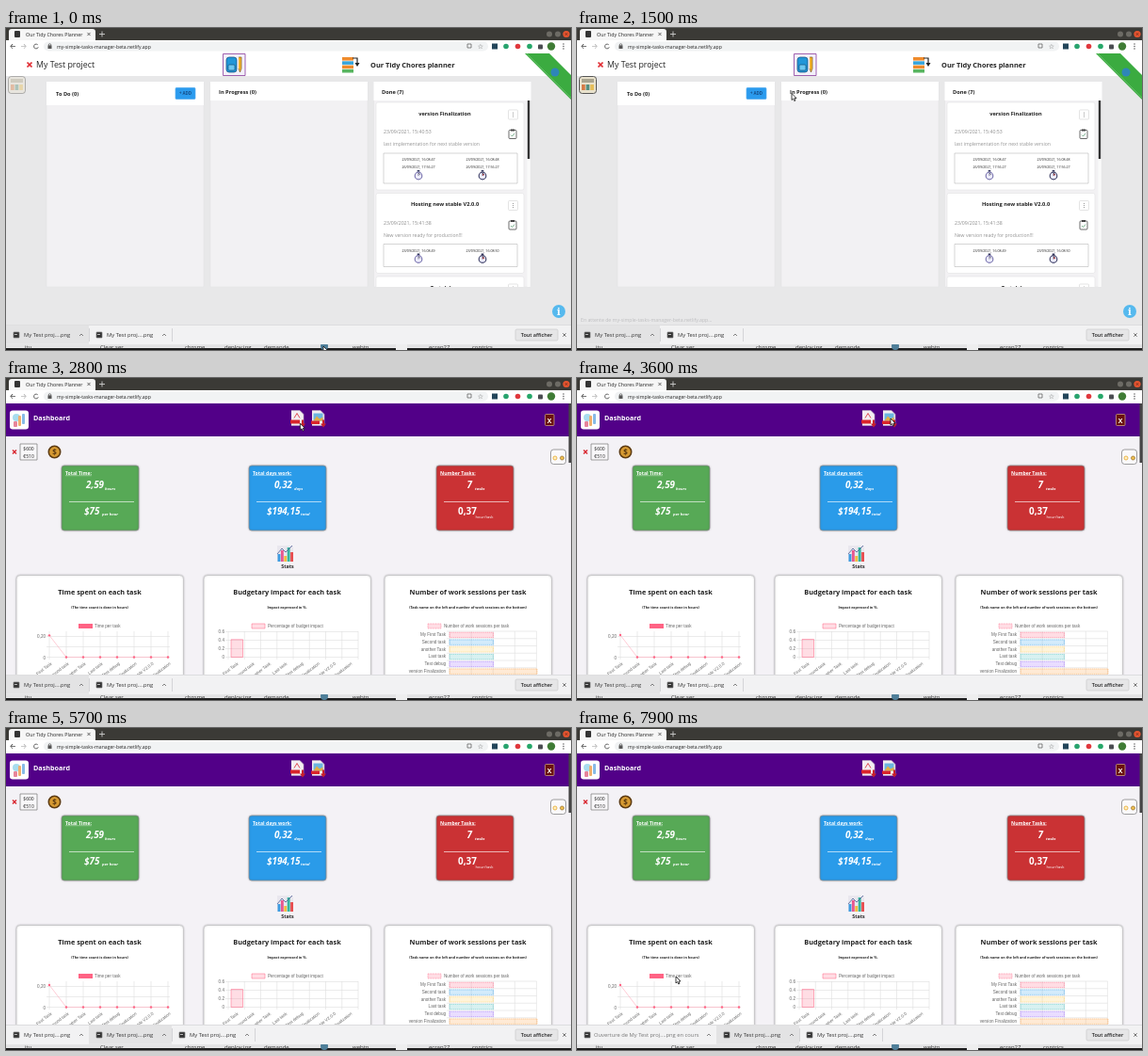
Recreate the animation shown at these times as an HTML page with a canvas. Size 600x342 px, loop 8 s.

```html
<!DOCTYPE html>
<html lang="en">
<head>
<meta charset="utf-8">
<title>Task board</title>
<style>
html, body { margin: 0; width: 100%; height: 100%; overflow: hidden; }
canvas { display: block; width: 600px; height: 342px; }
</style>
</head>
<body>
<canvas id="stage" width="600" height="342"></canvas>
<script>
const c = document.getElementById('stage').getContext('2d');
const LOOP = 8000, PAGE = 1800, SAVED = 5500, OPENING = 7100;
const SANS = '"Open Sans", sans-serif', CHART = '"Liberation Sans", sans-serif';
const TASKS = ['My First Task', 'Second task', 'another Task', 'Last task', 'Test debug',
  'version Finalization', 'Hosting new stable V2.0.0', 'version Finalization'];
const HUES = ['255,99,132', '54,162,235', '255,206,86', '75,192,192', '153,102,255', '255,159,64'];
const PATH = [[0, 337, 338], [250, 337, 338], [850, 10, 62], [1150, 10, 62], [1450, 228, 69.5],
  [2300, 228, 69.5], [3000, 333, 43], [3800, 333, 43], [4500, 330, 346], [5700, 330, 346],
  [6350, 2, 323], [6700, 2, 323], [6950, 25, 326], [7250, 25, 326], [7750, 105, 264], [8000, 105, 264]];

const clamp = v => Math.max(0, Math.min(1, v));
const easeOut = (v, power) => 1 - (1 - clamp(v)) ** power;

function rect(x, y, w, h, fill, stroke, r = 0, line = 0.7) {
  c.beginPath();
  c.roundRect(x, y, w, h, r);
  paint(fill, stroke, line);
}
function circle(x, y, r, fill, stroke, line = 0.8) {
  c.beginPath();
  c.arc(x, y, r, 0, 7);
  paint(fill, stroke, line);
}
function poly(points, fill, stroke, line = 0.8) {
  c.beginPath();
  for (let i = 0; i < points.length; i += 2) c.lineTo(points[i], points[i + 1]);
  paint(fill, stroke, line);
}
function paint(fill, stroke, line) {
  if (fill) { c.fillStyle = fill; c.fill(); }
  if (stroke) { c.strokeStyle = stroke; c.lineWidth = line; c.stroke(); }
}
function text(str, x, y, size, color = '#222', style = '', align = 'left', family = SANS) {
  c.font = `${style} ${size}px ${family}`;
  c.textAlign = align;
  c.fillStyle = color;
  c.fillText(str, x, y);
}
function cross(x, y, r, color, line) {
  poly([x - r, y - r, x + r, y + r], null, color, line);
  poly([x + r, y - r, x - r, y + r], null, color, line);
}
function shadowed(draw) {
  c.save();
  c.shadowColor = 'rgba(0,0,0,.25)';
  c.shadowBlur = 2;
  draw();
  c.restore();
}
function clipped(x, y, w, h, draw) {
  c.save();
  c.beginPath();
  c.rect(x, y, w, h);
  c.clip();
  draw();
  c.restore();
}

function browser() {
  rect(0, 0, 600, 13, '#3b3a36');
  rect(3, 1, 92, 14, '#f6f6f6', null, 3);
  rect(9, 3, 6, 7, '#333', null, 1);
  text('Our Tidy Chores Planner', 21, 8.8, 5.3);
  cross(88, 6.5, 1.6, '#444', 0.8);
  poly([99, 6.5, 105, 6.5], null, '#ddd');
  poly([102, 3.5, 102, 9.5], null, '#ddd');
  circle(577, 6.5, 3, '#6d6b65');
  circle(586, 6.5, 3, '#6d6b65');
  circle(595, 6.5, 3.6, '#e9542f');
  cross(595, 6.5, 1.3, '#5b2a1c', 0.7);
  rect(0, 13, 600, 14, '#fff');
  poly([10, 19.5, 5, 19.5, 7, 17, 5, 19.5, 7, 22], null, '#555');
  poly([16, 19.5, 21, 19.5, 19, 17, 21, 19.5, 19, 22], null, '#bbb');
  c.beginPath();
  c.arc(32, 19.5, 2.4, 0.3, 5.6);
  paint(null, '#555', 0.9);
  rect(40, 14.5, 472, 10, '#f1f3f4', null, 5);
  rect(44.5, 18.5, 4, 3.5, '#555');
  circle(46.5, 18, 1.3, null, '#555', 0.7);
  text('my-simple-tasks-manager-beta.netlify.app', 54, 21.5, 5.1);
  rect(490, 17, 4, 4, null, '#555');
  text('☆', 504, 22.2, 7, '#555', '', 'center', '"DejaVu Sans", sans-serif');
  rect(516, 16.5, 6, 6, '#24465a');
  circle(531, 19.5, 2.8, '#29a36e');
  circle(543.5, 19.5, 2.8, '#e0383d');
  circle(556, 19.5, 2.8, '#25a768');
  rect(565, 17.5, 5, 5, '#4a4d51', null, 1);
  circle(579, 19.5, 4.2, '#3f7c35');
  for (const y of [17, 19.5, 22]) circle(592, y, 0.7, '#444');
}

function board(t) {
  rect(0, 26, 600, 289, '#e8e8e9');
  rect(0, 26, 600, 25, '#fff');
  cross(25, 39, 2.5, '#e02b32', 1.7);
  text('My Test project', 32, 42, 8.8);
  rect(230.5, 27.5, 23.5, 23, '#f3f0fa', '#8a3b9c', 0, 0.8);
  rect(234, 31, 11, 16, '#2196d8', '#154f7a', 3);
  rect(236, 39, 7, 6, '#6cc7f0', '#154f7a', 1);
  poly([247, 31, 250, 31, 250, 43, 248.5, 47, 247, 43], '#f3b32c', '#6b4a16', 0.6);
  ['#ef8b2c', '#36a5dc', '#ef8b2c', '#57b560'].forEach((fill, i) => rect(357, 31 + i * 4.3, 12, 3.6, fill));
  poly([368, 32, 373, 32, 373, 39], null, '#222', 1.2);
  poly([370.5, 37, 375.5, 37, 373, 41], '#222');
  text('Our Tidy Chores planner', 387, 42, 7.4, '#222', 'bold');
  poly([550, 26, 576, 26, 600, 50, 600, 76], '#3bab40');
  poly([552, 26, 600, 74], null, '#84cf88', 0.5);
  circle(583, 47, 4.5, '#2e86b7');

  c.globalAlpha = t < 800 ? 0.4 : 1;
  rect(2.5, 51.5, 18, 18, '#e9e2cd', '#555', 3, 1);
  rect(5, 54, 13, 4, '#a9a48f');
  for (let i = 0; i < 3; i++) rect(5 + i * 4.6, 60, 3.7, 6, ['#d67b46', '#548f80', '#e5bd57'][i]);
  c.globalAlpha = 1;

  [[43, 25, 'To Do (0)', 53, 71.5], [217, 20, 'In Progress (0)', 226, 70], [390.5, 20, 'Done (7)', 399, 70]]
    .forEach(([x, h, label, tx, ty]) => {
      rect(x, 57, 167, 218, '#f2f1f3', '#e0e0e2', 1, 0.5);
      rect(x, 57, 167, h, '#fff');
      text(label, tx, ty, 5.7, '#222', 'bold');
    });
  rect(180, 63.5, 21, 12, '#2b9bee', '#50aaf0', 1);
  text('+ ADD', 190.5, 71.3, 4.4, '#174d87', 'bold', 'center');

  clipped(391, 77, 166, 198, () => {
    card(79, 'version Finalization', '23/09/2021, 15:40:53', 'last implementation for next stable version',
      ['23/09/2021, 16:08:47', '26/09/2021, 17:56:27'], ['23/09/2021, 16:08:48', '26/09/2021, 17:56:27']);
    card(175.5, 'Hosting new stable V2.0.0', '23/09/2021, 15:41:38', 'New version ready for production!!!',
      ['23/09/2021, 16:08:49'], ['23/09/2021, 16:08:50']);
    card(264, 'Test debug', '', '', [], []);
    rect(553.5, 77, 3, 198, '#fafafa');
    rect(553.8, 77, 2.4, 62, '#333');
  });
  circle(587, 301, 7, '#56b9ee');
  text('i', 587, 305, 11, '#fff', 'bold', 'center', '"Noto Serif", serif');
  if (t > 1200) text('En attente de my-simple-tasks-manager-beta.netlify.app…', 4, 312, 5.2, '#bdbdbf');
}

function card(y, title, date, note, starts, ends) {
  const boxHeight = 16 + starts.length * 8;
  rect(393, y, 157, boxHeight + 61, '#fff', '#e2e2e5', 2, 0.6);
  text(title, 466, y + 13.5, 5.7, '#222', 'bold', 'center');
  rect(533.5, y + 8, 10, 10, '#fff', '#d8d8d8', 1);
  for (let i = -1; i < 2; i++) circle(538.5, y + 13 + i * 2, 0.5, '#777');
  if (!date) return;
  text(date, 401, y + 33, 5.2, '#8b8b8b');
  text(note, 401, y + 46, 5.1, '#949494');
  rect(534, y + 29.5, 8, 9, '#fff', '#444', 1, 0.8);
  rect(536, y + 28.5, 4, 2, '#444');
  poly([536, y + 34.5, 537.5, y + 36, 540, y + 33], null, '#3f8f5c', 0.7);
  rect(401, y + 54, 142, boxHeight, '#fff', '#aaa', 0, 0.5);
  [[438, starts, '#7d78b0', '#f3eefa'], [506, ends, '#44466b', '#d34a48']].forEach(([x, lines, rim, hand]) => {
    lines.forEach((line, i) => text(line, x, y + 62 + i * 8, 3.6, '#222', '', 'center'));
    const cy = y + 62 + lines.length * 8;
    circle(x, cy, 3.8, '#eef', rim, 1.2);
    rect(x - 1.3, cy - 6, 2.6, 1.5, '#33375c');
    poly([x, cy, x, cy - 3, x + 2.2, cy - 1], hand, '#334', 0.6);
  });
}

function dashboard(t) {
  rect(0, 26, 600, 289, '#f4f2f6');
  rect(0, 26, 600, 36, '#520088');
  rect(4, 34.5, 20, 20, '#fff', null, 3);
  circle(11, 42, 4, '#a8dcee');
  rect(13, 40, 3, 11, '#f0b06f', null, 1);
  rect(17, 38, 3, 11, '#87b9e7', null, 1);
  rect(8, 46, 4, 6, '#e7859a', null, 1);
  text('Dashboard', 29, 45.3, 7.2, '#fff', 'bold');
  clipped(0, 27, 600, 35, () => {
    fileIcon(303, 34.5 - 36 * (1 - easeOut((t - 1850) / 500, 2)), true);
    fileIcon(325, 34.5 - 36 * (1 - easeOut((t - 1780) / 480, 2)), false);
  });
  rect(572.5, 38.5, 9.5, 12, '#6a1010', '#c9a27a', 1, 0.8);
  text('X', 577.2, 47.5, 7, '#fff', 'bold', 'center');

  cross(9, 78.5, 2, '#d8262f', 1.4);
  rect(15, 70, 18, 17, '#f8f7f9', '#777');
  text('$600', 24, 76.8, 5, '#222', '', 'center');
  text('€510', 24, 85, 5, '#222', '', 'center');
  circle(51.5, 78.5, 6.2, '#d79a32', '#5d3b12', 1.6);
  text('$', 51.5, 81.5, 8, '#5d3b12', 'bold', 'center');
  rect(578.5, 76, 16, 15.5, '#faf9fb', '#777', 3);
  circle(583, 85, 2, '#fff1c4', '#e5a72c', 0.8);
  circle(590.5, 85, 2, '#f1c151', '#9b7632', 0.8);

  tile(59, '#57a956', 'Total Time:', [85, '2,59', 105, 'hours'], [83, '$75', 102, 'per hour']);
  tile(258, '#2a9be9', 'Total days work:', [285, '0,32', 306, 'days'], [277, '$194,15', 313, 'total']);
  tile(457, '#ca3234', 'Number Tasks:', [489.5, '7', 498, 'tasks'], [480, '0,37', 498.5, 'hour/task'], true);

  rect(288, 178, 17, 17, '#e9e7ee');
  [8, 12, 6, 15, 10].forEach((h, i) =>
    rect(288.5 + i * 3.4, 195 - h, 2.9, h, ['#3d9be0', '#e8578f', '#f2bd3e', '#36b59e', '#e84d50'][i]));
  poly([288, 187, 293, 181, 297, 185, 304, 178], null, '#4a5a94', 0.8);
  text('Stats', 299, 202, 5.3, '#222', 'bold', 'center');

  panel(11, 'Time spent on each task', '(The time count is done in hours)');
  panel(210, 'Budgetary impact for each task', 'Impact expressed in %.');
  panel(402, 'Number of work sessions per task', '(Task name on the left and number of work sessions on the bottom)');
  charts(t);
  rect(597.5, 27, 2.5, 63, '#444');
}

function fileIcon(x, y, pdf) {
  poly([x, y, x + 9, y, x + 13, y + 4, x + 13, y + 16, x, y + 16], '#f3eef2', '#b9aebf', 0.6);
  if (pdf) {
    rect(x - 1, y + 10, 10, 4, '#d8242b');
    poly([x + 3, y + 8, x + 6, y + 3, x + 9, y + 8], null, '#d8242b');
  } else {
    rect(x + 1.5, y + 3, 10, 8, '#6bb4e0');
    poly([x + 1.5, y + 11, x + 5, y + 6, x + 8, y + 9, x + 11.5, y + 7, x + 11.5, y + 11], '#e2ae45');
    rect(x - 1, y + 11, 9, 3.5, '#d8242b');
  }
  poly([x + 9, y + 14, x + 11, y + 14, x + 11, y + 10, x + 13, y + 10, x + 13, y + 14, x + 15, y + 14, x + 12, y + 18], '#c71f2b');
}

function tile(x, fill, label, top, bottom, upright) {
  shadowed(() => rect(x, 93, 82, 69, fill, '#909090', 3, 0.7));
  text(label, x + 4, 102.5, 5.1, '#fff', 'bold');
  rect(x + 4, 103.6, c.measureText(label).width, 0.5, 'rgba(255,255,255,.7)');
  rect(x + 8, 131, 69, 0.7, 'rgba(255,255,255,.85)');
  const value = (row, y, style, unitStyle, drop) => {
    text(row[1], row[0], y, 9.9, '#fff', style);
    text(row[3], row[2], y + drop, 4.2, '#fff', unitStyle);
  };
  value(top, 117, 'italic bold', 'italic bold', 1.5);
  value(bottom, 145, upright ? 'bold' : 'italic bold', upright ? '' : 'italic bold', upright ? 3.7 : 1.2);
}

function panel(x, title, note) {
  shadowed(() => rect(x, 209.5, 177.5, 130, '#fff', '#c4c4c6', 4));
  text(title, x + 88.5, 230, 7.3, '#222', 'bold', 'center');
  text(note, x + 88.5, 245, 3.7, '#222', 'bold', 'center');
}

function charts(t) {
  const grid = (...points) => poly(points, null, '#dedede', 0.6);
  const label = (str, x, y, align) => text(str, x, y, 4.6, '#666', '', align, CHART);
  const slanted = (str, x, y) => {
    c.save();
    c.translate(x, y);
    c.rotate(-0.66);
    label(str, 0, 0, 'right');
    c.restore();
  };
  const bar = (x, y, w, h, hue, dash = []) => {
    c.setLineDash(dash);
    rect(x, y, w, h, `rgba(${hue},.22)`, `rgba(${hue},.85)`, 0, 0.6);
    c.setLineDash([]);
  };
  const pink = HUES[0];
  const grow = easeOut((t - 2150) / 1000, 4);

  rect(77, 261, 15, 5, '#ff6384');
  label('Time per task', 94, 265.2);
  bar(261, 261, 14, 5, pink);
  label('Percentage of budget impact', 278, 265.2);
  bar(448, 261, 14, 5, pink, [1, 0.6]);
  label('Number of work sessions per task', 465, 265.2);

  label('0,20', 42, 276, 'right');
  label('0', 42, 298.5, 'right');
  for (const y of [274.5, 285.5, 296.5]) grid(43, y, 174, y);
  for (let i = 0; i < 4; i++) {
    label(i ? (i / 5).toFixed(1) : '0', 232, 298 - i * 9, 'right');
    grid(233, 296.5 - i * 9, 374, 296.5 - i * 9);
  }
  TASKS.forEach((task, i) => {
    grid(46 + i * 18, 269, 46 + i * 18, 299);
    grid(236 + i * 17.25, 269, 236 + i * 17.25, 299);
    slanted(task, 49 + i * 18, 304);
    slanted(task, 247 + i * 17.25, 304);
  });
  grid(374, 269, 374, 299);
  if (grow > 0) {
    const first = 296.5 - 23.5 * grow;
    poly([46, first, 64, 296.5, 172, 296.5], null, '#ffa9bb', 0.6);
    TASKS.forEach((_, i) => circle(46 + i * 18, i ? 296.5 : first, 1.2, '#ff6384'));
    bar(239, 296.5 - 19 * grow, 12.5, 19 * grow, pink);
  }

  const reach = easeOut((t - 1742) / 1000, 4);
  for (let i = 0; i < 5; i++) grid(471 + i * 23.1, 269, 471 + i * 23.1, 318);
  HUES.forEach((hue, i) => {
    const y = 269 + i * 7.75;
    grid(468, y, 563.5, y);
    label(TASKS[i], 467, y + 5.2, 'right');
    bar(471, y + 1.2, (i < 5 ? 46.5 : 93) * reach, 5.4, hue, [1.3, 0.6]);
  });
}

function shelf(t) {
  rect(0, 315, 600, 21, '#f2f2f3');
  rect(0, 315, 600, 0.7, '#d6d6d8');
  const names = Array(t < SAVED ? 2 : 3).fill('My Test proj....png');
  const opening = t >= OPENING;
  let x = 0;
  names.forEach((name, i) => {
    const wide = opening && i === 0, width = wide ? 148 : 88;
    if (i === names.length - 2) rect(x, 315.7, width, 20, '#e3e3e4');
    rect(x + 8, 323, 6, 6, '#333', '#777', 0.5);
    rect(x + 9, 325, 3, 1, '#bbb');
    text(wide ? `Ouverture de ${name} en cours` : name, x + (wide ? 18 : 19), 328, 5.8, wide ? '#777' : '#333');
    poly([x + width - 10, 327, x + width - 8, 325, x + width - 6, 327], null, '#666', 0.8);
    x += width;
    rect(x, 319, 0.7, 14, '#c8c8ca');
  });
  if (t > 6100 && t < 6800) circle(10.5, 326, 4.8, null, '#e0583b', 1);
  rect(541, 320, 45, 12, '#e6e6e7', '#c9c9cb', 1.5);
  text('Tout afficher', 563.5, 328, 5.5, '#222', '600', 'center');
  cross(593, 326, 1.7, '#555', 0.8);

  rect(0, 336, 600, 4.5, '#e4e4e5');
  rect(0, 340, 600, 2, '#1c1c1c');
  clipped(0, 336, 600, 6, () => {
    [[20, 'itu'], [100, 'Clear ser'], [190, 'chrome'], [232, 'deploy.jpg'], [274, 'demande'],
      [368, 'webtn'], [449, 'ecran27...'], [495, 'contrics']]
      .forEach(([lx, str]) => text(str, lx, 340.5, 6, '#333'));
    circle(338, 338, 4, '#4f7f99');
    rect(414, 336, 12, 6, '#eee');
  });
}

function pointer(t) {
  const i = PATH.findIndex(key => key[0] > t);
  const [t0, x0, y0] = PATH[i - 1], [t1, x1, y1] = PATH[i];
  const u = (t - t0) / (t1 - t0), k = u * u * (3 - 2 * u);
  c.save();
  c.translate(x0 + (x1 - x0) * k, y0 + (y1 - y0) * k);
  poly([0, 0, 0, 7, 1.6, 5.6, 2.8, 8, 4, 7.4, 2.9, 5.1, 5, 5, 0, 0], '#fff', '#111', 0.8);
  c.restore();
}

function draw() {
  const t = performance.now() % LOOP;
  c.clearRect(0, 0, 600, 342);
  if (t < PAGE) board(t); else dashboard(t);
  browser();
  shelf(t);
  pointer(t);
  requestAnimationFrame(draw);
}
draw();
</script>
</body>
</html>
```
